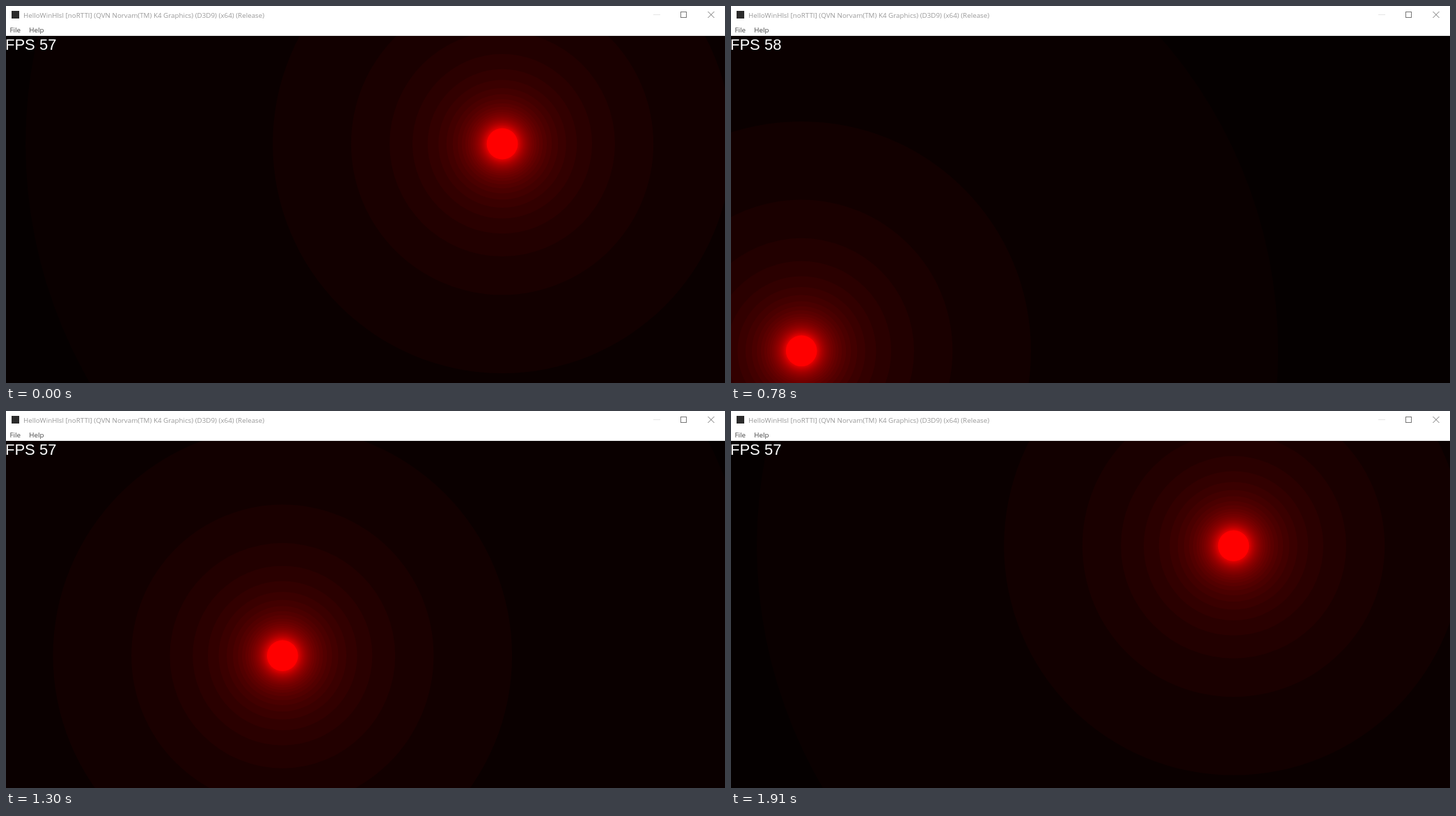
Animation, 1033 px wide and 542 px high, one loop 1.93 s. Source, as an HTML page with a canvas:

```html
<!DOCTYPE html>
<html lang="en">
<head>
<meta charset="utf-8">
<title>Moving light</title>
<style>
  html, body { margin: 0; width: 100%; height: 100%; overflow: hidden; background: #000; }
  canvas, svg { position: absolute; left: 0; top: 0; display: block; }
  .ui { font: 9.8px "Open Sans", "Noto Sans", sans-serif; }
  #fps { font: 22px "Liberation Sans", Arial, sans-serif; fill: #fff; }
</style>
</head>
<body>
<canvas id="view" width="1033" height="542"></canvas>
<svg width="1033" height="542" viewBox="0 0 1033 542">
  <rect width="1033" height="43" fill="#fff"/>
  <rect y="42" width="1033" height="1" fill="#f0f0f0"/>
  <rect x="8" y="7" width="11" height="11" fill="#2b2b2b"/>
  <text class="ui" x="25" y="16.5" fill="#999">HelloWinHlsl [noRTTI] (QVN Norvam(TM) K4 Graphics) (D3D9) (x64) (Release)</text>
  <text class="ui" x="5.5" y="38" fill="#444">File</text>
  <text class="ui" x="33.3" y="38" fill="#444">Help</text>
  <g fill="none" stroke="#777">
    <path d="M930 12.5h10" stroke="#e6e6e6"/>
    <rect x="969.5" y="8.5" width="8" height="8"/>
    <path d="M1008.5 8l9 9m0 -9l-9 9"/>
  </g>
  <text id="fps" x="-1" y="63">FPS 57</text>
</svg>
<script>
const W = 1033, H = 542, LOOP = 1930, FIRST = 50, LAST = 1910, STEPS = 24;
const ctx = document.getElementById('view').getContext('2d');
const fps = document.getElementById('fps');

// Time of the k-th picture update, on a 10 ms clock
function tick(k) {
  const even = FIRST + (LAST - FIRST) * k / STEPS;
  return 10 * Math.round((even + 0.1 * k * (STEPS - k)) / 10);
}

function heldTime(now) {
  let t = 0;
  for (let k = 0; k <= STEPS && tick(k) <= now; k++) t = tick(k);
  return t;
}

// Steady drift with a slight wobble, wrapping at the right edge
function lightX(t) {
  const a = Math.PI * t / LAST;
  return (713 + 1042 * t / LAST + 9 * Math.sin(a) + 3.5 * Math.sin(3 * a)) % W;
}

function disc(x, y, r, red) {
  ctx.fillStyle = `rgb(${red},0,0)`;
  ctx.beginPath();
  ctx.arc(x, y, r, 0, Math.PI * 2);
  ctx.fill();
}

function draw(t) {
  const x = lightX(t);
  const y = 545 - x * 0.4865;
  ctx.fillStyle = 'rgb(5,0,0)';
  ctx.fillRect(0, 0, W, H);
  // Brightness falls off as 1/r, in steps of 8
  for (let n = 1; n < 28; n++) disc(x, y, 5090 / (8 * n - 0.57), 8 * n + 2);
  disc(x, y, 22.3, 255);
  fps.textContent = 'FPS ' + (t >= FIRST && t < 990 ? 58 : 57);
}

const start = performance.now();
let shown = -1;
function frame() {
  const t = heldTime((performance.now() - start) % LOOP);
  if (t !== shown) draw(shown = t);
  requestAnimationFrame(frame);
}
frame();
</script>
</body>
</html>
```
